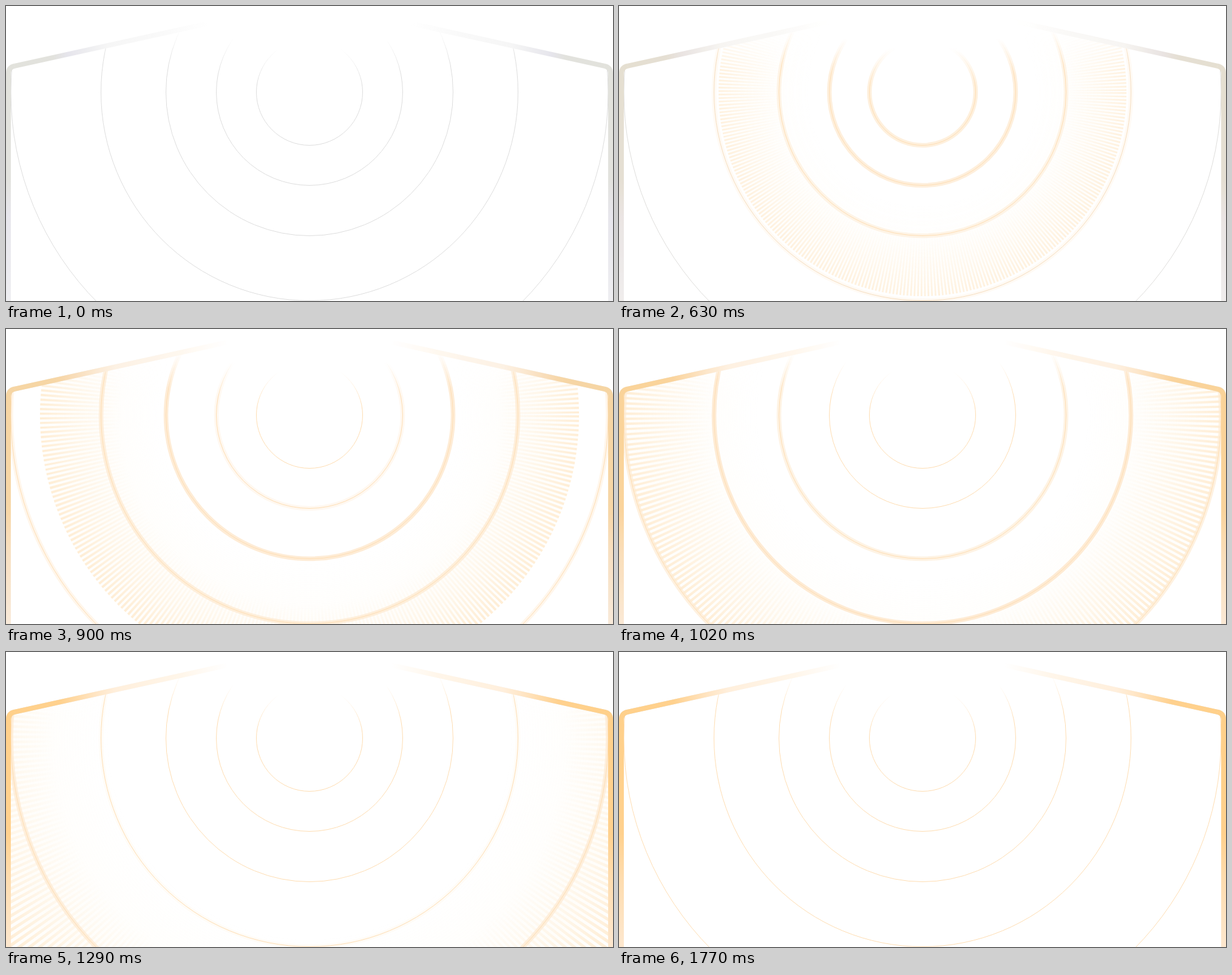
These frames come from a looping animation (1000x486 px, 1.8 s). An HTML page:

```html
<!DOCTYPE html>
<html lang="en">
<head>
<meta charset="utf-8">
<title>Ripple</title>
<style>
  html, body { margin: 0; width: 100%; height: 100%; overflow: hidden; background: #fff; }
  svg { display: block; width: 1000px; height: 486px; }
</style>
</head>
<body>
<svg viewBox="0 0 1000 486" fill="none">
  <defs>
    <clipPath id="house"><path d="M8 486V108Q8 104 14 102.5L500 -4L986 102.5Q992 104 992 108V486Z"/></clipPath>
    <linearGradient id="topFade" gradientUnits="userSpaceOnUse" x1="0" y1="35" x2="0" y2="105">
      <stop stop-color="#000"/><stop offset="1" stop-color="#fff"/>
    </linearGradient>
    <mask id="waveMask" maskUnits="userSpaceOnUse" x="0" y="0" width="1000" height="486">
      <rect width="1000" height="486" fill="url(#topFade)"/>
    </mask>
    <radialGradient id="rayFill" gradientUnits="userSpaceOnUse" cx="0" cy="0" r="100">
      <stop offset=".7" stop-color="#ffe8c8" stop-opacity="0"/>
      <stop offset=".85" stop-color="#ffe8c8" stop-opacity=".3"/>
      <stop offset="1" stop-color="#ffe8c8" stop-opacity=".75"/>
    </radialGradient>
    <radialGradient id="washFill" gradientUnits="userSpaceOnUse" cx="0" cy="0" r="100">
      <stop offset=".55" stop-color="#fff3dc" stop-opacity="0"/>
      <stop offset=".85" stop-color="#fff3dc" stop-opacity=".16"/>
      <stop offset="1" stop-color="#fff3dc" stop-opacity=".08"/>
    </radialGradient>
  </defs>
  <g clip-path="url(#house)">
    <g mask="url(#waveMask)">
      <g id="wave">
        <circle r="100" fill="url(#washFill)"/>
        <circle id="rays" r="85" stroke="url(#rayFill)" stroke-width="30"/>
      </g>
    </g>
    <g id="rings"></g>
  </g>
  <g id="frame"></g>
</svg>
<script>
const NS = 'http://www.w3.org/2000/svg';
const LOOP = 1800, STEP = 30, CX = 500, CY = 142;
const $ = id => document.getElementById(id);
const clamp = v => Math.max(0, Math.min(1, v));
const ramp = (t, a, b) => clamp((t - a) / (b - a));
const defs = document.querySelector('defs');

function add(parent, tag, attrs) {
  const el = document.createElementNS(NS, tag);
  for (const k in attrs) el.setAttribute(k, attrs[k]);
  return parent.appendChild(el);
}

function gradient(id, axis, from, to, stops) {
  const g = add(defs, 'linearGradient', {
    id, gradientUnits: 'userSpaceOnUse', x1: 0, y1: 0, x2: 0, y2: 0,
    [axis + 1]: from, [axis + 2]: to
  });
  for (const [pos, color] of stops)
    add(g, 'stop', { offset: (pos - from) / (to - from), 'stop-color': color });
}

// Piecewise linear value through [time, value] points
function track(t, pts) {
  if (t <= pts[0][0]) return pts[0][1];
  for (let i = 1; i < pts.length; i++) {
    const [a, u] = pts[i - 1], [b, v] = pts[i];
    if (t <= b) return u + (v - u) * (t - a) / (b - a);
  }
  return pts[pts.length - 1][1];
}

function mix(a, b, k) {
  return `rgb(${a.map((v, i) => Math.round(v + (b[i] - v) * k))})`;
}

// Radius, vertical fade, and the glow's start, peak and end
const rings = [
  { r: 87.5, fade: [70, 130], glow: [320, 580, 790] },
  { r: 153.5, fade: [54, 112], glow: [300, 720, 990] },
  { r: 236.5, fade: [38, 98], glow: [340, 870, 1250] },
  { r: 343.5, fade: [20, 84], glow: [500, 1010, 1350] },
  { r: 492, fade: [0, 60], glow: [680, 1170, 1700] }
];

rings.forEach((ring, i) => {
  gradient('fade' + i, 'y', ...ring.fade, [[ring.fade[0], '#000'], [ring.fade[1], '#fff']]);
  const mask = add(defs, 'mask', {
    id: 'ringMask' + i, maskUnits: 'userSpaceOnUse', x: 0, y: 0, width: 1000, height: 486
  });
  add(mask, 'rect', { width: 1000, height: 486, fill: `url(#fade${i})` });
  const g = add($('rings'), 'g', { mask: `url(#ringMask${i})` });
  const circle = width => add(g, 'circle', { cx: CX, cy: CY, r: ring.r, 'stroke-width': width });
  ring.halo = circle(7.5);
  ring.halo.setAttribute('stroke', '#feebd3');
  ring.line = circle(1);
});

const looks = {
  grey: {
    side: [[98, '#e2e2dc'], [285, '#e2e2dd'], [345, '#e7e6ec'], [490, '#eeeef1']],
    roof: [[12, '#e2e2dc'], [78, '#e2e2dd'], [102, '#e6e5ec'], [140, '#efeff1'],
           [168, '#f6f6f6'], [250, '#f9f9f9'], [332, '#fff']]
  },
  warm: {
    side: [[98, '#ffd08a'], [300, '#ffd18e'], [370, '#fedcae'], [490, '#fde8d0']],
    roof: [[12, '#ffd08a'], [90, '#ffd18e'], [150, '#ffe6c6'], [180, '#ffefdc'],
           [290, '#fff6ea'], [365, '#fff']]
  }
};

const layers = {};
for (const name in looks) {
  const { side, roof } = looks[name];
  gradient(name + 'Side', 'y', 98, 490, side);
  gradient(name + 'Roof', 'x', 12, roof[roof.length - 1][0], roof);
  const layer = layers[name] = add($('frame'), 'g', {});
  const half = add(layer, 'g', { id: name + 'Half', 'stroke-width': 8 });
  const end = roof[roof.length - 1][0];
  add(half, 'path', { d: `M14 98.8L${end} ${98.8 - (end - 14) * 0.2195}`, stroke: `url(#${name}Roof)` });
  add(half, 'path', { d: 'M4 490V111Q4 101 14.3 98.73', stroke: `url(#${name}Side)` });
  add(layer, 'use', { href: `#${name}Half`, transform: 'translate(1000) scale(-1 1)' });
}

const dash = 2 * Math.PI * 85 / 720;
$('rays').setAttribute('stroke-dasharray', `${dash} ${dash}`);

function draw(t) {
  const radius = 84 + 0.4 * t;
  $('wave').setAttribute('transform', `translate(${CX} ${CY}) scale(${radius / 100})`);
  $('wave').setAttribute('opacity', t < 180 ? 0 :
    track(t, [[180, 0], [390, 0.4], [700, 0.9], [900, 1], [1320, 1], [1620, 0]]));

  for (const { halo, line, glow: [start, peak, end] } of rings) {
    halo.setAttribute('opacity', Math.min(ramp(t, start, peak), 1 - ramp(t, peak, end)));
    line.setAttribute('stroke', mix([221, 221, 221], [254, 221, 178], ramp(t, start - 60, start + 200)));
  }

  layers.warm.setAttribute('opacity',
    track(t, [[570, 0], [750, 0.38], [900, 0.7], [1020, 0.82], [1290, 1]]));
}

function tick() {
  const t = performance.now() % LOOP;
  draw(Math.floor(t / STEP) * STEP);
  requestAnimationFrame(tick);
}
draw(0);
tick();
</script>
</body>
</html>
```
